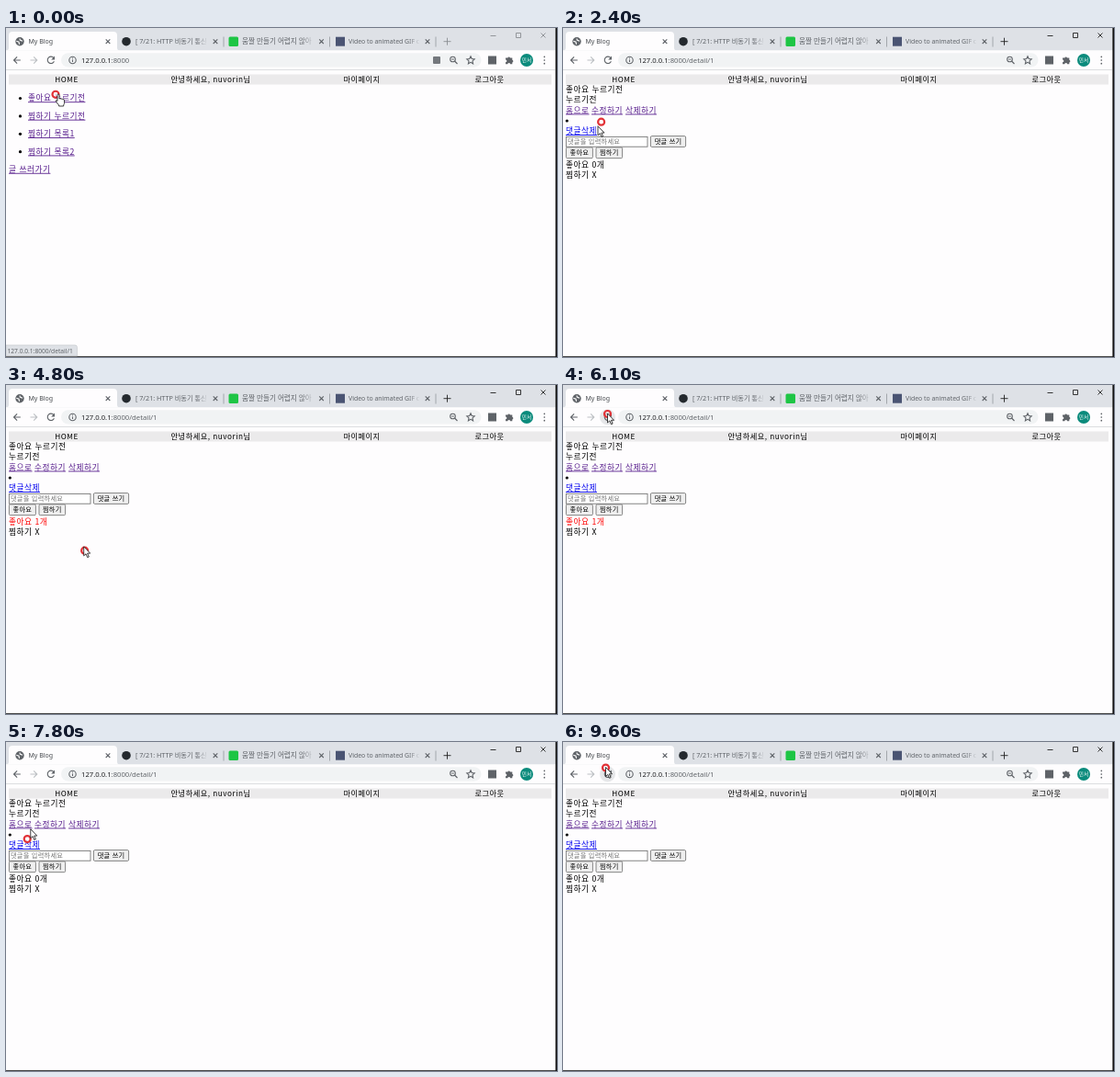
Recreate the animation shown at these times as an HTML page. Size 600x358 px, loop 9.7 s.

```html
<!DOCTYPE html>
<html lang="ko">
<head>
<meta charset="utf-8">
<title>My Blog</title>
<style>
html, body { margin: 0; width: 100%; height: 100%; overflow: hidden; background: #fefdfe; }
svg { display: block; width: 100%; height: 100%; }
text { font-family: 'Noto Sans CJK KR', 'Noto Sans CJK', 'Noto Sans', sans-serif; white-space: pre; }
.ui text { font-family: 'Noto Sans', 'Noto Sans CJK KR', sans-serif; fill: #5f6368; }
.page text { font-size: 8.7px; font-weight: 300; letter-spacing: .5px; }
.page .nav text { font-size: 8.2px; text-anchor: middle; }
.page .form text { font-size: 7.2px; letter-spacing: .25px; }
.link {
  fill: #551a8b; text-decoration: underline; text-decoration-thickness: .7px;
  text-decoration-skip-ink: none; text-underline-offset: 1px;
}
.fresh { fill: #0000ee; }
.line { fill: none; stroke: #5f6368; stroke-width: 1.1; }
</style>
</head>
<body>
<svg viewBox="0 0 600 358" preserveAspectRatio="none">
  <defs>
    <linearGradient id="fade">
      <stop offset="0" stop-color="#dee1e6" stop-opacity="0"/>
      <stop offset=".45" stop-color="#dee1e6"/>
    </linearGradient>
  </defs>
  <rect width="600" height="358" fill="#fefdfe"/>

  <g class="ui">
    <rect width="600" height="24.5" fill="#dee1e6"/>
    <path d="M0 24.5q3 0 3-3V8q0-4 4-4H117q4 0 4 4v13.500q0 3 3 3z" fill="#fefdfe"/>
    <circle cx="15" cy="14.700" r="4.700" fill="#5f6368"/>
    <path d="M11.300 14.200l2.700 1 .5 2.600M15 11.500l.3 1.500 2.700 1.300" fill="none" stroke="#fff" stroke-width="1.200"/>
    <text x="24.500" y="17.400" font-size="7" style="fill:#45494d">My Blog</text>
    <circle cx="131" cy="14.700" r="4.800" fill="#24292e"/>
    <text x="141" y="17.400" font-size="7.200">[ 7/21: HTTP 비동기 통신</text>
    <rect x="242.500" y="9.500" width="10.500" height="10.500" rx="1.500" fill="#1ec545"/>
    <text x="257" y="17.400" font-size="7.600">움짤 만들기 어렵지 않아</text>
    <rect x="359" y="9.700" width="10" height="10" fill="#4a5473"/>
    <text x="373" y="17.400" font-size="6.900">Video to animated GIF c</text>
    <g id="tabEnds"></g>
    <path id="controls" d="M476.500 14.700h8M480.500 10.700v8M527.500 8.500h6M555.500 5.500h5v5h-5zM582.500 5.500l5 5m0-5l-5 5" fill="none" stroke-width=".9"/>

    <rect y="24.500" width="600" height="21" fill="#fefdfe"/>
    <path d="M0 45.500H598" stroke="#d5d7da" stroke-width=".8"/>
    <path d="M15.800 35H8.500m3.600-3.600L8.500 35l3.600 3.600" class="line"/>
    <path d="M26.500 35h7.300m-3.600-3.600l3.600 3.600-3.600 3.600" class="line" style="stroke:#bcbfc3"/>
    <circle id="hover" cx="48.500" cy="35" r="8.500" fill="#e6e7e9"/>
    <path d="M51.900 32.600a3.700 3.700 0 1 0 .5 3.600" class="line"/>
    <path d="M53 30.600v3.800h-3.800z" fill="#5f6368"/>
    <rect x="60" y="27.300" width="457.500" height="15.200" rx="7.600" fill="#f1f3f4"/>
    <circle cx="72.500" cy="35" r="3.700" class="line"/>
    <path d="M72.500 34.500v2.600M72.500 32.600v1" class="line"/>
    <text x="82" y="37.900" font-size="7.700"><tspan fill="#202124">127.0.0.1</tspan>:8000<tspan id="path">/detail/1</tspan></text>
    <rect id="translate" x="465" y="31" width="8" height="8" rx="1" fill="#74787d"/>
    <circle cx="486.500" cy="34" r="2.800" class="line"/>
    <path d="M488.500 36l3 3M485.200 34h2.600" class="line"/>
    <path d="M506 30.800l1.250 2.700 2.950.35-2.200 2 .6 2.950-2.600-1.500-2.600 1.500.6-2.950-2.200-2 2.950-.35z" class="line"/>
    <rect x="525" y="30.500" width="9" height="9" fill="#5f6368"/>
    <path d="M544 32.500h2.300a1.400 1.400 0 0 1 2.700 0h2.300v2.300a1.400 1.400 0 0 1 0 2.700v1.800H549a1.300 1.300 0 0 0-2.600 0H544v-2.100a1.300 1.300 0 0 0 0-2.600z" fill="#5f6368"/>
    <circle cx="567" cy="35" r="7" fill="#0b8b7c"/>
    <text x="567" y="37.100" font-size="5.600" text-anchor="middle" style="fill:#fff">민서</text>
    <path d="M586.300 31.300v.01M586.300 35v.01M586.300 38.700v.01" stroke="#5f6368" stroke-width="1.700" stroke-linecap="round"/>
  </g>

  <g class="page">
    <g class="nav">
      <rect x="3" y="50.500" width="591" height="11" fill="#ebeaeb"/>
      <text x="66" y="59.300">HOME</text>
      <text x="223" y="59.300">안녕하세요, nuvorin님</text>
      <text x="387.500" y="59.300">마이페이지</text>
      <text x="526.500" y="59.300">로그아웃</text>
    </g>
    <g id="home">
      <g id="list"></g>
      <text x="3" y="156.800" class="link">글 쓰러가기</text>
    </g>
    <g id="detail">
      <text x="3" y="70.300">좋아요 누르기전</text>
      <text x="3" y="81.300">누르기전</text>
      <text x="3" y="92.500" class="link">홈으로</text>
      <text x="31" y="92.500" class="link">수정하기</text>
      <text x="68" y="92.500" class="link">삭제하기</text>
      <circle cx="4.300" cy="101" r="1.600"/>
      <text x="3" y="115" class="link fresh">댓글삭제</text>
      <g class="form">
        <rect x="3.400" y="118.400" width="88.600" height="10.800" fill="#fff" stroke="#767676" stroke-width=".9"/>
        <text x="5" y="126.200" fill="#757575">댓글을 입력하세요</text>
        <g id="buttons"></g>
      </g>
      <text id="likes" x="3" y="151.700"></text>
      <text x="3" y="162.700">찜하기 X</text>
    </g>
  </g>

  <rect y="357" width="600" height="1" fill="#4a4a4a"/>
  <rect x="598.400" width="1.600" height="358" fill="#111"/>
  <g id="status" class="ui">
    <path d="M0 345H75q2.500 0 2.500 2.500V357H0z" fill="#dee1e6" stroke="#c3c6ca" stroke-width=".6"/>
    <text x="1.500" y="353.500" font-size="6.650">127.0.0.1:8000/detail/1</text>
  </g>

  <circle id="ring" r="3.500" fill="#fff" fill-opacity=".55" stroke-width="2.200"/>
  <g id="cursor" stroke="#111" stroke-width=".8" stroke-linejoin="round" fill="#fff">
    <path id="arrow" d="M0 0V10l2.300-2.100 1.700 3.900 1.600-.7-1.700-3.800H7z"/>
    <path id="hand" d="M-1 1q0-1 1-1t1 1V5q1.200-.8 2 .2 1.200-.6 1.900.4 1.600-.4 1.600 1.200V9.500q0 1.300-.8 2.300V13H.6v-1L-2.600 8q-.6-1.200.4-1.500L-1 7.500z"/>
  </g>
</svg>
<script>
const LOOP = 9700, STEP = 100, LAG = 50;
const $ = id => document.getElementById(id);
const show = (id, on) => $(id).setAttribute('visibility', on ? 'visible' : 'hidden');
const between = (t, a, b) => t >= a && t < b;

$('tabEnds').innerHTML = [228, 343.5, 459].map(x => `
  <rect x="${x - 21}" y="6" width="30" height="17" fill="url(#fade)"/>
  <path d="M${x + 9} 9.500v11" stroke="#93979c" stroke-width=".8"/>`).join('') +
  [111, 228, 343.5, 459].map(x =>
    `<path d="M${x - 2.3} 12.400l4.600 4.600m0-4.600l-4.600 4.600" class="line"/>`).join('');

$('list').innerHTML = ['좋아요 누르기전', '찜하기 누르기전', '찜하기 목록1', '찜하기 목록2'].map((s, i) => `
  <circle cx="15.500" cy="${76.5 + i * 19.4}" r="1.600"/>
  <text x="24" y="${79.3 + i * 19.4}" class="link">${s}</text>`).join('');

const button = (x, y, w, label, id) => `
  <rect id="${id}" x="${x}" y="${y}" width="${w}" height="11.800" rx="1.300" fill="#efefef" stroke="#767676" stroke-width=".9"/>
  <text x="${x + w / 2}" y="${y + 8.5}" text-anchor="middle">${label}</text>`;
$('buttons').innerHTML = button(95.4, 117.6, 38.2, '댓글 쓰기', 'write') +
  button(3.4, 129.9, 29, '좋아요', 'like') + button(36, 129.9, 28.6, '찜하기', 'save');

// Pointer stops: time, x, y
const route = [
  [-100, 51, 71.5], [0, 57, 72], [300, 57.5, 79.5], [2000, 57.5, 79.5], [2800, 18.5, 134],
  [3700, 18.5, 134], [4400, 86, 181], [4700, 86, 181], [5600, 48.5, 31], [6400, 48.5, 31],
  [7100, 13, 134.5], [7500, 13, 134.5], [8200, 48, 33.5], [8800, 47, 33.5], [9000, 47, 33.5],
  [9600, 46.5, 27.5], [LOOP, 46.5, 27.5]
];
const clicks = [1000, 3500, 5700, 7300, 8300, 9000];

function pointer(t) {
  const i = route.findIndex(p => p[0] > t);
  const [t0, x0, y0] = route[i - 1], [t1, x1, y1] = route[i];
  const u = (t - t0) / (t1 - t0), e = u * u * (3 - 2 * u);
  return [x0 + (x1 - x0) * e, y0 + (y1 - y0) * e];
}

function draw(t) {
  const [x, y] = pointer(t), [rx, ry] = pointer(t - LAG);
  const home = t < 1200;
  const pressed = clicks.some(c => between(t, c, c + 200));
  const liked = between(t, 3700, 7500);

  show('home', home);
  show('detail', !home);
  show('translate', home);
  show('path', !home);
  show('status', t < 2200);
  show('hover', Math.hypot(x - 48.5, y - 35) < 9);
  // The window is unfocused until the first click
  $('controls').setAttribute('stroke', t < 1000 ? '#8b8e92' : '#222');

  const over = between(x, 3, 33) && between(y, 130, 142);
  $('like').setAttribute('fill', !over ? '#efefef' : pressed ? '#f5f5f5' : '#e5e5e5');
  $('like').setAttribute('stroke', !over ? '#767676' : pressed ? '#8d8d8d' : '#4f4f4f');
  $('likes').textContent = `좋아요 ${liked ? 1 : 0}개`;
  $('likes').setAttribute('fill', liked ? '#f00' : '#000');

  $('ring').setAttribute('transform', `translate(${rx} ${ry + .5})`);
  $('ring').setAttribute('stroke', pressed ? '#45bfe4' : '#e23237');
  $('cursor').setAttribute('transform', `translate(${x} ${y})`);
  show('hand', home);
  show('arrow', !home);
}

const start = performance.now();
function tick(now) {
  const t = Math.max(0, now - start) % LOOP;
  draw(Math.floor(t / STEP) * STEP);
  requestAnimationFrame(tick);
}
draw(0);
requestAnimationFrame(tick);
</script>
</body>
</html>
```
